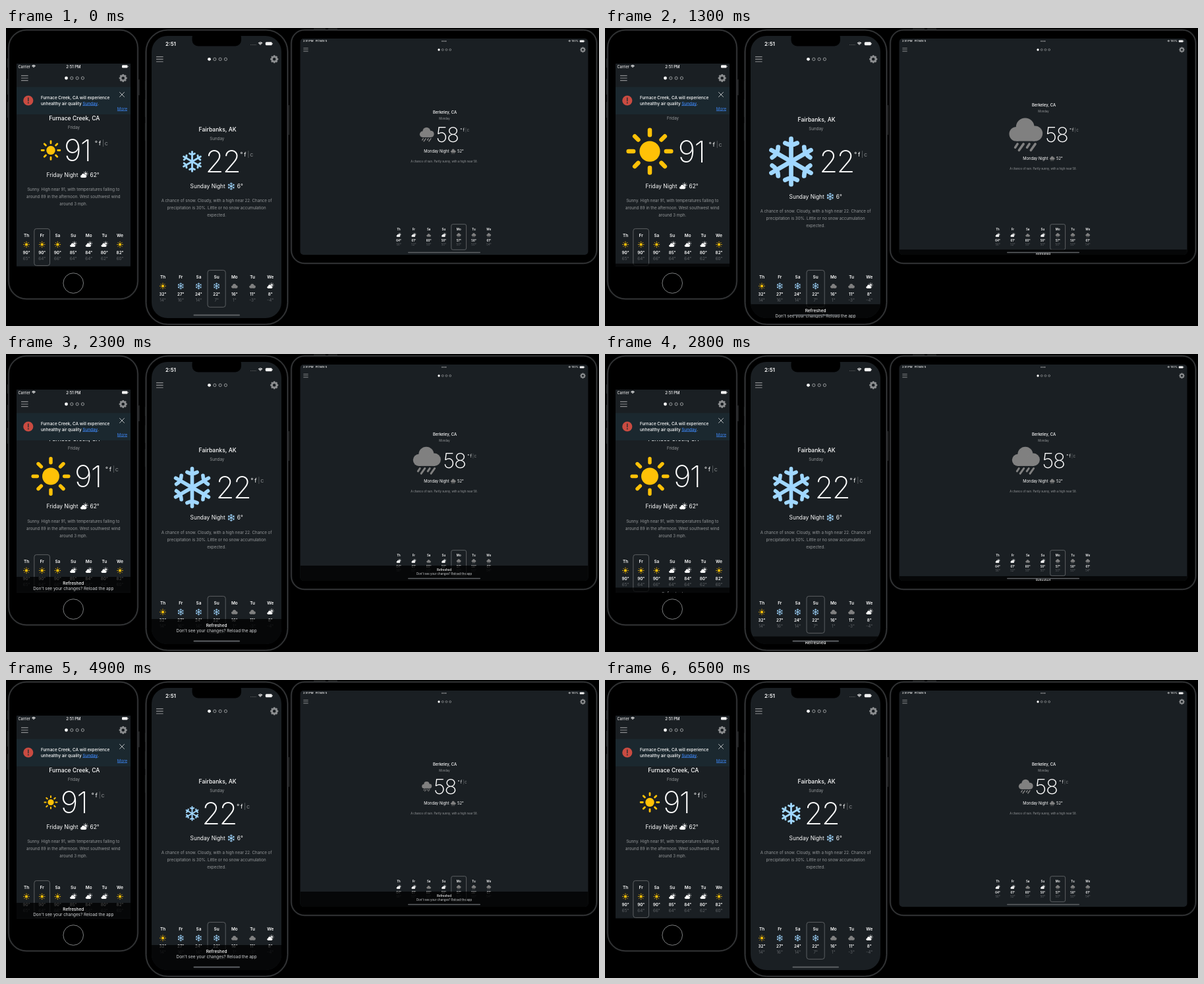
Animation of 900x452 px, one loop 6.6 s. Source, as an HTML page with a canvas:

```html
<!DOCTYPE html>
<html lang="en">
<head>
<meta charset="utf-8">
<title>Weather on three devices</title>
<style>
  html, body { margin: 0; width: 100%; height: 100%; overflow: hidden; background: #000; }
  canvas { display: block; }
</style>
</head>
<body>
<canvas id="stage" width="900" height="452"></canvas>
<script>
const ctx = document.getElementById('stage').getContext('2d');
const LOOP = 6600, STEP = 100;
const SCREEN = '#1a1f23', WHITE = '#fff', GREY = '#96999b', DIM = '#606468', BLUE = '#3d86f5';
const DAYS = ['Th', 'Fr', 'Sa', 'Su', 'Mo', 'Tu', 'We'];
const START_SIZE = 30.5;

// Each edit changes the icon size and slides a toast in, then out.
const EDITS = [
  { start: 700, out: 1300, size: 71 },
  { start: 1700, out: 2500, size: 59 },
  { start: 2800, out: 3300, size: 51 },
  { start: 4500, out: 5100, size: 21 },
  { start: 5700, out: 6200, size: START_SIZE }
];

const DEVICES = [
  {
    k: 1, cx: 102.3, mid: 185.5, screen: [16, 54, 173, 307.5, 0], body: [4, 3, 196, 408, 27],
    title: 'Furnace Creek, CA', day: 'Friday', temp: '91', icon: 'sun', iconX: 68, unitDx: 45,
    night: ['Friday Night', 'partly', 118.5, '62°'],
    text: ['Sunny. High near 91, with temperatures falling to',
      'around 89 in the afternoon. West southwest wind', 'around 3 mph.'],
    row: { x: 31, y: 315, step: 23.67, selected: 1,
      icons: ['sun', 'sun', 'sun', 'partly', 'partly', 'partly', 'sun'],
      high: [90, 90, 90, 85, 84, 80, 82], low: [65, 64, 66, 64, 64, 62, 60] },
    menu: [28.3, 76], dots: [91.5, 76], gear: [177.7, 76],
    toastY: 338, lead: 124, maxRise: 14
  },
  {
    k: 1, cx: 319.6, mid: 202.5, screen: [221, 12, 197, 428, 24], body: [212.5, 3, 215, 446.5, 33],
    title: 'Fairbanks, AK', day: 'Sunday', temp: '22', icon: 'snow', iconX: 282.5, unitDx: 51,
    night: ['Sunday Night', 'snow', 341.8, '6°'],
    text: ['A chance of snow. Cloudy, with a high near 22. Chance of',
      'precipitation is 30%. Little or no snow accumulation', 'expected.'],
    row: { x: 238, y: 378, step: 27.2, selected: 3,
      icons: ['sun', 'snow', 'snow', 'snow', 'cloud', 'cloud', 'partly'],
      high: [32, 27, 24, 22, 16, 11, 8], low: [14, 16, 14, 7, 1, -3, -4] },
    menu: [233.3, 47.3], dots: [308.5, 47.3], gear: [407.2, 47.3],
    toastY: 402, lead: 67, homeBar: [284.5, 434.5, 70.5, 2]
  },
  {
    k: 0.69, cx: 665, mid: 161.5, screen: [446.5, 16, 437, 328, 5], body: [433, 3, 463.5, 354, 20],
    title: 'Berkeley, CA', day: 'Monday', temp: '58', icon: 'rain', iconX: 638.7, unitDx: 51.5,
    night: ['Monday Night', 'rain', 678.8, '52°'],
    text: ['A chance of rain. Partly sunny, with a high near 58.'],
    row: { x: 596, y: 305, step: 22.8, selected: 4,
      icons: ['partly', 'partly', 'cloud', 'partly', 'rain', 'rain', 'rain'],
      high: [64, 61, 60, 58, 57, 58, 61], low: [56, 52, 50, 50, 50, 50, 54] },
    menu: [455, 33], dots: [657, 33], gear: [875.5, 33],
    toastY: 321, lead: 98, homeBar: [610, 339.7, 110, 1.6]
  }
];

const clamp = v => Math.max(0, Math.min(1, v));

// y is the middle of the capital letters
function label(str, x, y, size, color = WHITE, weight = 400, align = 'center') {
  ctx.font = `${weight} ${size}px Inter, Roboto, sans-serif`;
  ctx.textAlign = align;
  ctx.fillStyle = color;
  ctx.fillText(str, x, y + size * 0.364);
  return ctx.measureText(str).width;
}

function box(x, y, w, h, r, fill, stroke, width = 1) {
  ctx.beginPath();
  ctx.roundRect(x, y, w, h, r);
  if (fill) { ctx.fillStyle = fill; ctx.fill(); }
  if (stroke) { ctx.strokeStyle = stroke; ctx.lineWidth = width; ctx.stroke(); }
}

function disc(x, y, r, fill) {
  ctx.beginPath();
  ctx.arc(x, y, r, 0, Math.PI * 2);
  ctx.fillStyle = fill;
  ctx.fill();
}

function lines(list, color, width, cap = 'round') {
  ctx.beginPath();
  for (const [x1, y1, x2, y2] of list) { ctx.moveTo(x1, y1); ctx.lineTo(x2, y2); }
  ctx.strokeStyle = color;
  ctx.lineWidth = width;
  ctx.lineCap = cap;
  ctx.stroke();
}

function rays(count, from, to) {
  return Array.from({ length: count }, (_, i) => {
    const c = Math.cos(i * 2 * Math.PI / count), s = Math.sin(i * 2 * Math.PI / count);
    return [c * from, s * from, c * to, s * to];
  });
}

function cloudShape(color) {
  disc(-0.02, -0.22, 0.275, color);
  disc(-0.285, -0.015, 0.215, color);
  disc(0.275, -0.03, 0.23, color);
  ctx.fillRect(-0.285, -0.1, 0.56, 0.3);
}

// Icons are drawn in a unit square around the origin.
const ICONS = {
  sun() {
    disc(0, 0, 0.22, '#ffc107');
    lines(rays(8, 0.35, 0.455), '#ffc107', 0.092);
  },
  snow() {
    for (let i = 0; i < 6; i++) {
      ctx.save();
      ctx.rotate(i * Math.PI / 3);
      lines([[0, 0, 0, -0.474]], '#a0d7ff', 0.092);
      ctx.beginPath();
      ctx.moveTo(-0.125, -0.383);
      ctx.quadraticCurveTo(0, -0.313, 0.125, -0.383);
      ctx.stroke();
      ctx.restore();
    }
  },
  cloud() {
    ctx.translate(0, 0.14);
    cloudShape('#808080');
  },
  rain() {
    cloudShape('#808080');
    lines([[-0.25, 0.285, -0.32, 0.39], [-0.07, 0.285, -0.205, 0.475],
      [0.107, 0.285, 0.036, 0.39], [0.285, 0.285, 0.15, 0.475]], '#808080', 0.07);
  },
  partly() {
    ctx.save();
    ctx.translate(0.2, -0.16);
    disc(0, 0, 0.18, WHITE);
    lines(rays(8, 0.26, 0.33), WHITE, 0.075);
    ctx.restore();
    ctx.translate(-0.08, 0.2);
    ctx.save();
    ctx.scale(0.95, 0.95);
    cloudShape(SCREEN);
    ctx.restore();
    ctx.scale(0.84, 0.84);
    cloudShape(WHITE);
  }
};

function icon(name, x, y, size) {
  ctx.save();
  ctx.translate(x, y);
  ctx.scale(size, size);
  ICONS[name]();
  ctx.restore();
}

function gear(x, y, k) {
  ctx.save();
  ctx.translate(x, y);
  ctx.scale(k, k);
  lines(rays(8, 4, 6), '#8b8d8f', 2.4, 'butt');
  ctx.beginPath();
  ctx.arc(0, 0, 3.7, 0, Math.PI * 2);
  ctx.lineWidth = 2.8;
  ctx.stroke();
  ctx.restore();
}

function wifi(x, y, k) {
  ctx.strokeStyle = WHITE;
  ctx.lineCap = 'butt';
  ctx.lineWidth = 1.4 * k;
  for (const r of [0.8, 2.7, 4.6]) {
    ctx.beginPath();
    ctx.arc(x, y + 2.4 * k, r * k, -Math.PI * 0.76, -Math.PI * 0.24);
    ctx.stroke();
  }
}

function battery(x, y, w, h) {
  box(x, y - h / 2, w, h, h * 0.3, '#f4f4f4');
  ctx.fillRect(x + w + 0.4, y - h * 0.15, 0.7, h * 0.3);
}

function navBar({ k, menu, dots, gear: g }) {
  const [mx, my] = menu;
  lines([-3.7, 0, 3.7].map(dy => [mx - 5.3 * k, my + dy * k, mx + 5.3 * k, my + dy * k]), '#8b8d8f', 1.2 * k, 'butt');
  for (let i = 0; i < 4; i++) {
    const x = dots[0] + i * 8.3 * k;
    if (i === 0) { disc(x, dots[1], 2.4 * k, WHITE); continue; }
    ctx.beginPath();
    ctx.arc(x, dots[1], 2.1 * k, 0, Math.PI * 2);
    ctx.strokeStyle = '#b4b6b8';
    ctx.lineWidth = 0.8 * k;
    ctx.stroke();
  }
  gear(...g, k);
}

function weather(d, size) {
  const { k, cx } = d;
  const grow = Math.max(0, 0.6 * (size - 45)) * k;
  const rise = Math.min(grow, d.maxRise ?? grow);
  const drop = 2 * grow - rise;
  const mid = d.mid + (drop - rise) / 2;

  label(d.title, cx + 1.5 * k, d.mid - 48.5 * k - rise, 8.6 * k, WHITE, 500);
  label(d.day, cx + 0.7 * k, d.mid - 34.5 * k - rise, 6.2 * k, GREY);

  icon(d.icon, d.iconX, mid, (d.icon === 'sun' ? 1 : 1.03) * size * k);
  const left = d.iconX + (0.56 * size + 5.2) * k;
  ctx.letterSpacing = `${-1.8 * k}px`;
  label(d.temp, left - 2.2 * k, mid + 0.3, 45.5 * k, WHITE, 200, 'left');
  ctx.letterSpacing = '0px';
  const ux = left + d.unitDx * k, uy = mid - 10.5 * k;
  label('°', ux - 0.5 * k, uy, 9.5 * k, WHITE, 400, 'left');
  label('f', ux + 7.2 * k, uy, 9 * k, WHITE);
  label('|', ux + 12.2 * k, uy, 9 * k, '#85888a', 300);
  label('c', ux + 17 * k, uy, 9 * k, '#85888a');

  const [name, nightIcon, nx, nightTemp] = d.night;
  const ny = d.mid + 37.5 * k + drop;
  label(name, nx - 9 * k, ny, 8.4 * k, WHITE, 400, 'right');
  icon(nightIcon, nx, ny, 11 * k);
  label(nightTemp, nx + 9 * k, ny, 8.4 * k, WHITE, 400, 'left');

  d.text.forEach((line, i) => label(line, cx, d.mid + 59.5 * k + drop + i * 11 * k, 6.15 * k, GREY));
}

function forecast({ k, row }) {
  DAYS.forEach((day, i) => {
    const x = row.x + i * row.step, y = row.y;
    label(day, x, y, 6.4 * k, WHITE, 600);
    icon(row.icons[i], x, y + 13.4 * k, 9.6 * k);
    label(row.high[i] + '°', x, y + 25.4 * k, 6.3 * k, WHITE, 600);
    label(row.low[i] + '°', x, y + 34.4 * k, 6.3 * k, DIM);
  });
  const x = row.x + row.selected * row.step;
  box(x - row.step / 2, row.y - 10.6 * k, row.step, 56 * k, 3.5 * k, null, '#6b6f72', 0.8);
}

function alertBanner() {
  box(16, 89.5, 173, 41.5, 0, '#1b282f');
  disc(33.8, 110, 7.6, '#c94b41');
  lines([[33.8, 106, 33.8, 110.8]], '#1b282f', 1.3);
  disc(33.8, 113.5, 0.9, '#1b282f');
  label('Furnace Creek, CA will experience', 53, 105.7, 6.35, WHITE, 500, 'left');
  let x = 53 + label('unhealthy air quality ', 53, 114.2, 6.35, WHITE, 500, 'left');
  const w = label('Sunday', x, 114.2, 6.35, BLUE, 500, 'left');
  lines([[x, 117.6, x + w, 117.6]], BLUE, 0.7, 'butt');
  label('.', x + w, 114.2, 6.35, WHITE, 500, 'left');
  lines([[172.5, 97.5, 179.5, 104.5], [179.5, 97.5, 172.5, 104.5]], '#b5b9bc', 1);
  const m = label('More', 184, 122.3, 6.2, BLUE, 400, 'right');
  lines([[184 - m, 125.6, 184, 125.6]], BLUE, 0.7, 'butt');
}

function toast(d, hidden) {
  if (hidden >= 1) return;
  const { k, cx, screen: [x, y, w, h] } = d;
  const height = y + h - d.toastY;
  const top = d.toastY + height * hidden;
  ctx.fillStyle = 'rgba(0, 0, 0, 0.76)';
  ctx.fillRect(x, top, w, height);
  label('Refreshed', cx, top + 9.2 * k, 6.5 * k, WHITE, 500);
  label("Don't see your changes? Reload the app", cx, top + 17.6 * k, 6.4 * k, '#d6d8da');
}

function toastHidden(d, t) {
  const edit = EDITS.findLast(e => t >= e.start);
  if (!edit) return 1;
  const leaving = clamp((t - edit.out + d.lead) / 150);
  if (t >= edit.out) return leaving;
  return (1 - clamp((t - edit.start + 50) / 300)) ** 2;
}

function iconSize(t) {
  return EDITS.findLast(e => t >= e.start + STEP)?.size ?? START_SIZE;
}

function body(d) {
  const [x, y, w, h, r] = d.body;
  box(x, y, w, h, r, '#000', '#1c1d1e', 2.6);
  box(x, y, w, h, r, null, '#3e4042', 1);
}

function sideButtons() {
  const color = '#2c2e2f';
  [[2, 46, 14], [2, 77, 24], [2, 112, 24], [201, 78, 24], [210.8, 80, 14],
    [210.8, 108, 27], [210.8, 144, 27], [428.6, 117, 45]].forEach(([x, y, h]) => box(x, y, 1.6, h, 0.5, color));
  box(467, 0.7, 18, 1.5, 0.5, color);
  box(489, 0.7, 14, 1.5, 0.5, color);
}

function statusBars() {
  label('Carrier', 18.5, 58.6, 5.6, WHITE, 400, 'left');
  wifi(42, 58.4, 0.75);
  label('2:51 PM', 102.3, 58.6, 5.9, WHITE, 500);
  battery(176, 58.4, 8.5, 4.2);

  box(282.5, 6, 74.5, 21.5, 9, '#000');
  label('2:51', 250, 23.7, 8, WHITE, 600);
  for (let i = 0; i < 4; i++) disc(371.8 + i * 2.4, 25.5, 0.6, '#777');
  wifi(386, 23.8, 0.85);
  battery(393.8, 23.7, 10, 5);

  label('2:51 PM', 451, 20, 4.1, WHITE, 500, 'left');
  label('Fri Nov 5', 469.8, 20, 4.1, WHITE, 500, 'left');
  for (let i = -1; i < 2; i++) disc(664.8 + i * 2.7, 20, 0.8, '#ddd');
  wifi(855.3, 20, 0.5);
  label('100%', 868.8, 20, 4, WHITE, 400, 'right');
  battery(870.8, 20, 6.6, 3.2);
}

function device(d, t) {
  body(d);
  ctx.save();
  box(...d.screen, SCREEN);
  ctx.clip();
  weather(d, iconSize(t));
  forecast(d);
  navBar(d);
  if (d.maxRise) alertBanner();
  toast(d, toastHidden(d, t));
  if (d.homeBar) box(...d.homeBar, 1, '#5d6164');
  ctx.restore();
}

function draw(now) {
  const t = Math.floor(now % LOOP / STEP) * STEP;
  ctx.fillStyle = '#000';
  ctx.fillRect(0, 0, 900, 452);
  sideButtons();
  DEVICES.forEach(d => device(d, t));
  ctx.beginPath();
  ctx.arc(102.2, 387, 15.3, 0, Math.PI * 2);
  ctx.strokeStyle = '#8a8c8d';
  ctx.lineWidth = 0.9;
  ctx.stroke();
  statusBars();
}

let origin;
function tick(now) {
  origin ??= now;
  draw(now - origin);
  requestAnimationFrame(tick);
}
requestAnimationFrame(tick);
</script>
</body>
</html>
```
